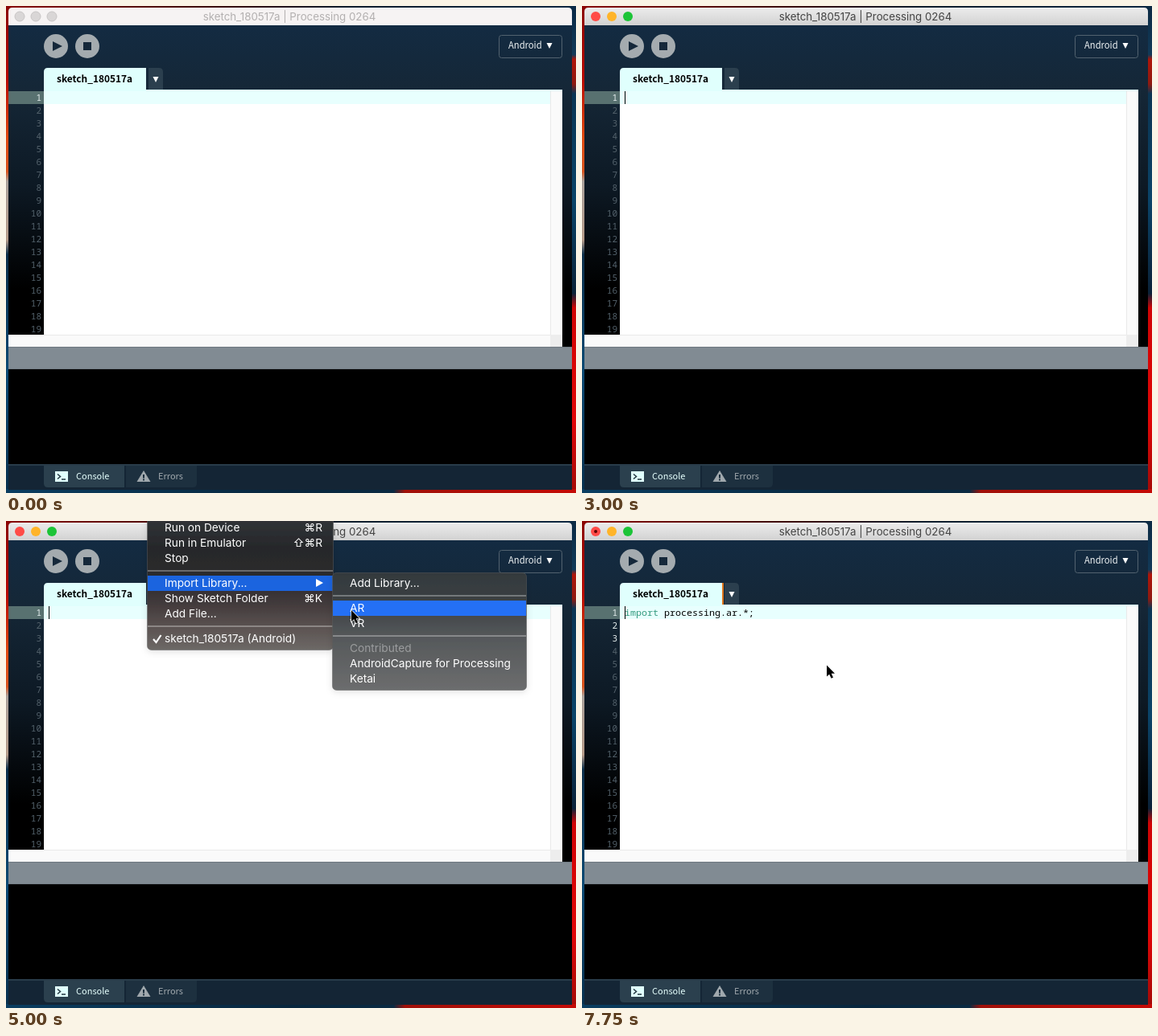
Animation of 708x606 px, one loop 8000 ms. Source, as an HTML page:

```html
<!DOCTYPE html>
<html lang="en">
<head>
<meta charset="utf-8">
<title>Sketch editor</title>
<style>
html, body { margin: 0; width: 100%; height: 100%; overflow: hidden; background: #0a2c47; }
svg { display: block; width: 708px; height: 606px; }
text { white-space: pre; }
.ui { font-family: Inter, Roboto, sans-serif; }
.menu { font: 13.7px Inter, Roboto, "DejaVu Sans", sans-serif; fill: #fff; }
.src { font-family: "Noto Sans CJK JP", "Noto Sans CJK SC", "Noto Sans CJK", "Open Sans", sans-serif; }
.mono { font-family: "Noto Sans Mono", "DejaVu Sans Mono", monospace; }
</style>
</head>
<body>
<svg viewBox="0 0 708 606" xmlns="http://www.w3.org/2000/svg">
  <defs>
    <linearGradient id="left" x2="0" y2="1">
      <stop offset="0" stop-color="#8a0503"/><stop offset=".15" stop-color="#b80a02"/>
      <stop offset=".27" stop-color="#e04a10"/><stop offset=".34" stop-color="#d8541e"/>
      <stop offset=".36" stop-color="#a9a09a"/><stop offset=".48" stop-color="#b59a88"/>
      <stop offset=".51" stop-color="#0c2f4b"/><stop offset=".75" stop-color="#0d4a74"/>
      <stop offset="1" stop-color="#08304e"/>
    </linearGradient>
    <linearGradient id="right" x2="0" y2="1">
      <stop offset="0" stop-color="#0b2a44"/><stop offset=".1" stop-color="#123a58"/>
      <stop offset=".11" stop-color="#b01508"/><stop offset=".16" stop-color="#8f1a10"/>
      <stop offset=".18" stop-color="#0b3553"/><stop offset=".4" stop-color="#0a4469"/>
      <stop offset=".59" stop-color="#0b2238"/><stop offset=".62" stop-color="#d00404"/>
      <stop offset=".85" stop-color="#e00606"/><stop offset="1" stop-color="#a30a06"/>
    </linearGradient>
    <linearGradient id="bottom">
      <stop offset="0" stop-color="#0a3d60"/><stop offset=".5" stop-color="#08263d"/>
      <stop offset=".68" stop-color="#0a2a42"/><stop offset=".7" stop-color="#a01008"/>
      <stop offset="1" stop-color="#c40a06"/>
    </linearGradient>
    <linearGradient id="top">
      <stop offset="0" stop-color="#8a0503"/><stop offset=".3" stop-color="#4a0806"/>
      <stop offset=".6" stop-color="#10202f"/><stop offset="1" stop-color="#0b2a44"/>
    </linearGradient>
    <linearGradient id="bar" x2="0" y2="1">
      <stop offset="0" stop-color="#ececec"/><stop offset="1" stop-color="#d2d2d2"/>
    </linearGradient>
    <linearGradient id="body" gradientUnits="userSpaceOnUse" x1="0" x2="0" y1="24" y2="424">
      <stop offset="0" stop-color="#132b42"/><stop offset=".2" stop-color="#152737"/>
      <stop offset=".5" stop-color="#0d1924"/><stop offset=".82" stop-color="#000"/>
    </linearGradient>
    <linearGradient id="glass" gradientUnits="userSpaceOnUse" x1="0" x2="0" y1="0" y2="160">
      <stop offset="0" stop-color="#303336"/><stop offset=".2" stop-color="#27282b"/>
      <stop offset=".45" stop-color="#2b2a2d"/><stop offset=".65" stop-color="#433b3c"/>
      <stop offset=".85" stop-color="#5e5654"/><stop offset="1" stop-color="#6c6866"/>
    </linearGradient>
    <linearGradient id="glass2" gradientUnits="userSpaceOnUse" x1="0" x2="0" y1="64" y2="210">
      <stop offset="0" stop-color="#33393d"/><stop offset=".25" stop-color="#3b4043"/>
      <stop offset=".55" stop-color="#55585a"/><stop offset="1" stop-color="#6c6d6e"/>
    </linearGradient>
    <filter id="shade" x="-10%" y="-10%" width="120%" height="125%">
      <feDropShadow dx="0" dy="2" stdDeviation="4" flood-opacity=".12"/>
    </filter>
  </defs>

  <rect width="708" height="606" fill="#0a2c47"/>
  <rect width="708" height="4" fill="url(#top)"/>
  <rect width="5" height="606" fill="url(#left)"/>
  <rect x="702" width="6" height="606" fill="url(#right)"/>
  <rect y="601" width="708" height="5" fill="url(#bottom)"/>

  <!-- window -->
  <path id="titleBar" d="M3 24V7q0-5 5-5H698q5 0 5 5V24z"/>
  <g id="lights"></g>
  <circle id="dirty" cx="17" cy="13" r="2" fill="#5c0503"/>
  <text id="title" class="ui" x="352" y="18" font-size="13.3" text-anchor="middle">sketch_180517a | Processing 0264</text>
  <rect x="3" y="24" width="700" height="400" fill="url(#body)"/>

  <!-- toolbar -->
  <g fill="#a4abaf"><circle cx="62" cy="50" r="15"/><circle cx="101" cy="50" r="15"/></g>
  <path d="M58 44L70 50L58 56zM96 45h10v10h-10z" fill="#15283a"/>
  <rect x="612.5" y="36.5" width="78" height="28" rx="3" fill="none" stroke="#52626f"/>
  <text class="src" x="624" y="53" font-size="11.2" font-weight="500" fill="#f2f6f7">Android</text>
  <path d="M671.5 46h7l-3.5 7z" fill="#fff"/>

  <!-- editor -->
  <path d="M47 104V82q0-5 5-5H174V104z" fill="#e0fffd"/>
  <text class="src" x="63" y="95" font-size="11.9" font-weight="700" fill="#000">sketch_180517a</text>
  <rect id="mark" x="174" y="77" width="2" height="27" fill="#e0761c"/>
  <path d="M177 104V77H190q5 0 5 5V104z" fill="#2b3f4e"/>
  <path d="M182.5 88h7l-3.5 7z" fill="#fff"/>
  <rect x="47" y="104" width="644" height="305" fill="#fff"/>
  <rect x="47" y="104" width="644" height="2" fill="#e0fffd"/>
  <rect x="47" y="106" width="629" height="16" fill="#e8fffe"/>
  <rect x="3" y="106" width="44" height="16" fill="#587170"/>
  <g id="numbers" class="mono" font-size="11" text-anchor="end"></g>
  <rect x="676" y="106" width="15" height="303" fill="#fafafa"/>
  <rect x="676" y="106" width="1" height="303" fill="#e9e9e9"/>
  <rect x="3" y="409" width="688" height="15" fill="#fafafa"/>
  <rect x="47" y="409" width="629" height="1" fill="#e9e9e9"/>
  <rect x="676" y="409" width="15" height="15" fill="#ededed"/>
  <text id="code" class="mono" x="53" y="118" font-size="11.67"><tspan fill="#33997e">import</tspan> processing.ar.*;</text>
  <rect id="caret" x="53" y="106" width="1" height="16"/>

  <!-- console -->
  <rect x="3" y="424" width="700" height="28" fill="#818b93"/>
  <rect x="3" y="424" width="700" height="1" fill="#6f7981"/>
  <rect x="3" y="451" width="700" height="1" fill="#737d85"/>
  <rect x="3" y="452" width="700" height="118" fill="#000"/>
  <rect x="3" y="570" width="700" height="32" fill="#142535"/>
  <rect x="3" y="570" width="700" height="2" fill="#293c4a"/>
  <path d="M47 572H147V599H52q-5 0-5-5z" fill="#2b404e"/>
  <path d="M149 572H237V594q0 5-5 5H149z" fill="#1d303f"/>
  <rect x="61" y="579" width="16" height="13" fill="#e0fffd"/>
  <path d="M64 582.500l3.500 3l-3.500 3M69 589h5" fill="none" stroke="#22343f" stroke-width="1.500"/>
  <path d="M171 578L179.500 592H162.500z" fill="#a0a8ad"/>
  <path d="M170 583h2v4.500h-2zM170 588.500h2v2h-2z" fill="#1d303f"/>
  <g class="src" font-size="11" font-weight="500">
    <text x="87" y="589" fill="#e6fffd">Console</text>
    <text x="189" y="589" fill="#a0a8ad">Errors</text>
  </g>

  <!-- menus -->
  <g id="menus" class="menu">
    <g id="menu">
      <rect x="175.500" y="-12" width="231" height="172.500" rx="5" fill="url(#glass)" stroke="#5d5d5d" stroke-opacity=".5" filter="url(#shade)"/>
      <rect id="importRow" x="176" y="68" width="230" height="19" fill="#1b64df"/>
      <path d="M385 72L394 77L385 82z"/>
      <path d="M183 147l3.500 4l6-9" fill="none" stroke="#fff" stroke-width="2.200"/>
    </g>
    <g id="submenu">
      <rect x="405.500" y="64.500" width="241" height="146" rx="5" fill="url(#glass2)" stroke="#5d5d5d" stroke-opacity=".5" filter="url(#shade)"/>
      <rect id="arRow" x="406" y="99" width="240" height="19" fill="#2470f5"/>
    </g>
  </g>

  <path id="cursor" d="M0 0V14L3.200 11.200L5.600 16.300L8 15.200L5.700 10.200H10z" fill="#000" stroke="#fff" stroke-width="1.300" paint-order="stroke"/>
</svg>
<script>
const LOOP = 8000, STEP = 250;
const $ = id => document.getElementById(id);

function add(parent, tag, attrs, text = '') {
  const el = document.createElementNS('http://www.w3.org/2000/svg', tag);
  for (const k in attrs) el.setAttribute(k, attrs[k]);
  el.textContent = text;
  parent.appendChild(el);
  return el;
}

const show = (id, on) => $(id).setAttribute('display', on ? 'inline' : 'none');

function fillMenu(parent, x, width, items, rules) {
  for (const [y, label, keys, fill = '#fff'] of items) {
    add(parent, 'text', { x, y, fill }, label);
    if (keys) add(parent, 'text', { x: 393, y, 'text-anchor': 'end' }, keys);
  }
  for (const y of rules) {
    add(parent, 'rect', { x: x - 21, y, width, height: 2, fill: '#fff', 'fill-opacity': .3 });
  }
}

fillMenu($('menu'), 197, 230, [
  [13, 'Run on Device', '⌘R'],
  [32, 'Run in Emulator', '⇧⌘R'],
  [51, 'Stop'],
  [82, 'Import Library...'],
  [101, 'Show Sketch Folder', '⌘K'],
  [120, 'Add File...'],
  [151, 'sketch_180517a (Android)']
], [61, 130]);

fillMenu($('submenu'), 427, 240, [
  [82, 'Add Library...'],
  [113, 'AR'],
  [132, 'VR'],
  [163, 'Contributed', '', '#9b9d9e'],
  [182, 'AndroidCapture for Processing'],
  [201, 'Ketai']
], [92, 142]);

const lights = ['#ff4b47', '#ffb429', '#1cc437'].map((color, i) => ({
  color, el: add($('lights'), 'circle', { cx: 17 + 20 * i, cy: 13, r: 6 })
}));

const numbers = Array.from({ length: 19 }, (_, i) =>
  add($('numbers'), 'text', { x: 44, y: 118 + 16 * i }, i + 1));

// pointer tip: time, x, y (no position = hidden)
const pointer = [
  [0], [1500, 615, 148], [1750, 563, 184], [2250, 516, 144], [2500],
  [3500, 205, 12], [3750, 205, 14], [4000, 236, 82], [4250, 239.5, 83.5],
  [4750, 387, 87], [5000, 429, 111], [5250, 443, 114], [5500, 450, 115],
  [5750, 457, 114], [6000, 461, 114], [6250, 463, 114], [7750, 304, 179.5]
];

function draw(time) {
  const t = Math.floor(time / STEP) * STEP;
  const active = t >= 2000, edited = t >= 7500;

  $('titleBar').setAttribute('fill', active ? 'url(#bar)' : '#f6f3f3');
  $('title').setAttribute('fill', active ? '#444' : '#b3b0b0');
  for (const { el, color } of lights) {
    el.setAttribute('fill', active ? color : '#d9d6d6');
    el.setAttribute('stroke', active ? 'none' : '#c8c5c5');
  }
  show('dirty', edited);
  show('mark', edited);
  show('code', edited);
  numbers.forEach((el, i) =>
    el.setAttribute('fill', i < (edited ? 3 : 1) ? '#e4eeee' : '#54626c'));

  show('caret', active && (edited || t % 1000 < 500));
  show('menus', t >= 3500 && !edited);
  show('importRow', t >= 4000);
  show('submenu', t >= 4250);
  show('arRow', t >= 5000 && t !== 7000);
  $('menus').setAttribute('opacity', t >= 7250 ? .27 : 1);

  const [, x, y] = pointer.filter(p => p[0] <= t).pop();
  show('cursor', x !== undefined);
  if (x !== undefined) $('cursor').setAttribute('transform', `translate(${x} ${y})`);
}

const start = performance.now();
function tick() {
  draw((performance.now() - start) % LOOP);
  requestAnimationFrame(tick);
}
tick();
</script>
</body>
</html>
```
